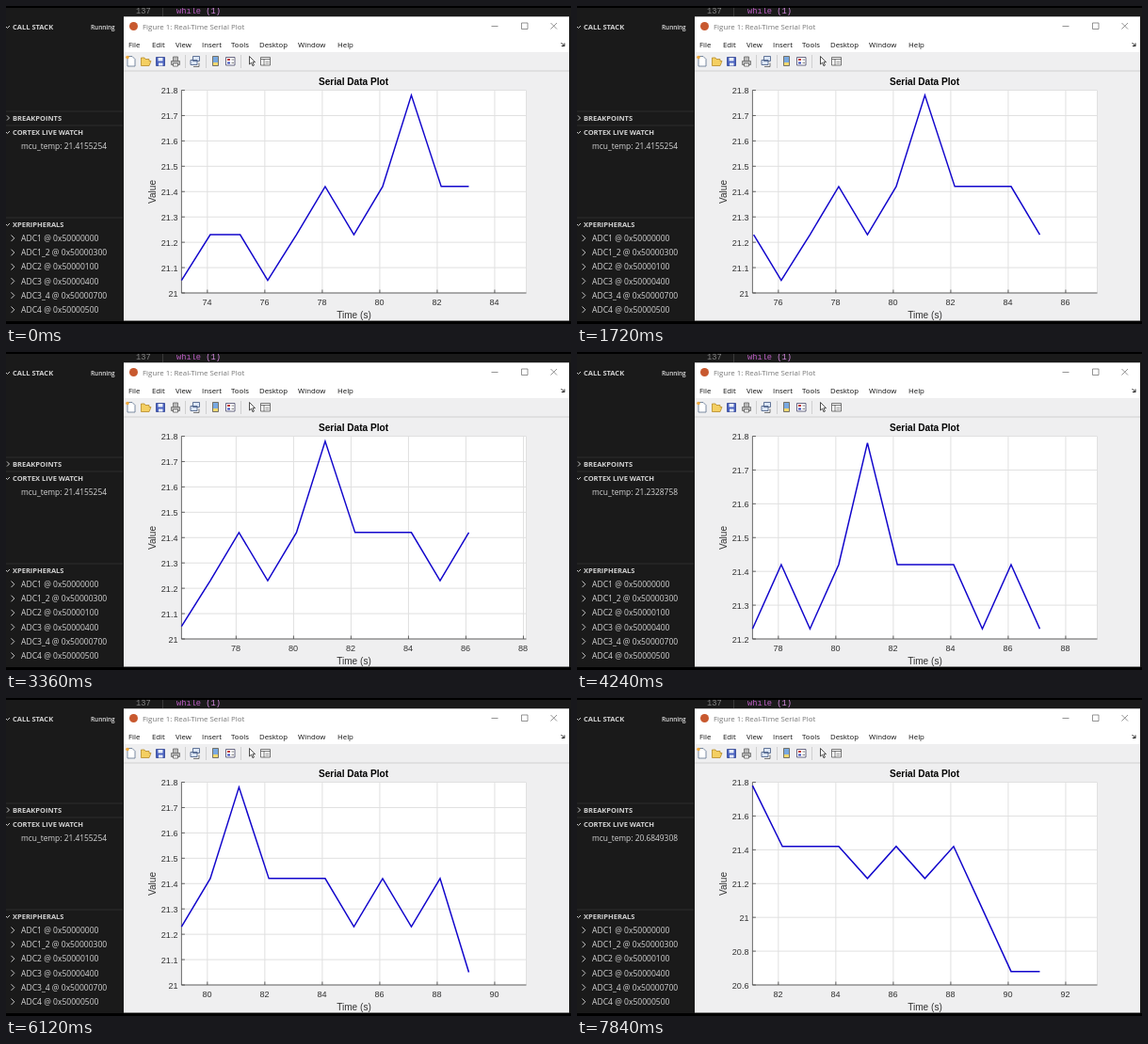
Recreate the animation shown at these times as an HTML page. Size 600x338 px, loop 8 s.

```html
<!DOCTYPE html>
<html lang="en">
<head>
<meta charset="utf-8">
<title>Real-Time Serial Plot</title>
<style>
  html, body { margin: 0; width: 100%; height: 100%; overflow: hidden; background: #000; }
  svg { display: block; width: 600px; height: 338px; }
  text { font-family: "Open Sans", sans-serif; white-space: pre; }
  .head { font-size: 7.5px; font-weight: 700; fill: #d2d2d2; }
  .item { font-size: 8.55px; fill: #d6d6d6; }
  .code { font: 8.7px "Liberation Mono", monospace; }
  .menu { font-size: 7.8px; fill: #111; }
  .line { fill: none; }
  #plot text, .label { font-family: "Liberation Sans", Arial, sans-serif; fill: #333; }
  #plot text { font-size: 9.1px; }
  .label { font-size: 10.1px; text-anchor: middle; }
</style>
</head>
<body>
<svg viewBox="0 0 600 338">
  <rect width="600" height="335" fill="#1a1a1a"/>

  <!-- editor strip -->
  <path class="line" stroke="#3a3a3a" d="M166.500 0v11"/>
  <text class="code" x="138" y="8" fill="#858585">137</text>
  <text class="code" x="181" y="8" fill="#c060c8">while <tspan fill="#d58be0">(1)</tspan></text>
  <rect width="600" height="2" fill="#000"/>

  <!-- sidebar -->
  <path class="line" stroke="#2c2c2c" d="M0 112H124M0 127H124M0 225H124"/>
  <text class="head" x="7" y="25">CALL STACK</text>
  <text x="90" y="24.500" font-size="6.4" font-weight="600" fill="#e0e0e0">Running</text>
  <text class="head" x="7" y="122">BREAKPOINTS</text>
  <text class="head" x="7" y="137">CORTEX LIVE WATCH</text>
  <text class="item" x="16" y="152" style="font-size:8.4px">mcu_temp: <tspan id="temp"></tspan></text>
  <text class="head" x="7" y="235">XPERIPHERALS</text>
  <path class="line" stroke="#c8c8c8" d="M-1 21l2.500 2.500 2.500-2.500M1 116.500l2.500 2.500-2.500 2.500M-1 133l2.500 2.500 2.500-2.500M-1 231l2.500 2.500 2.500-2.500"/>
  <g id="peripherals"></g>

  <!-- figure window -->
  <rect x="125" y="11.500" width="473" height="323" fill="#efeff0"/>
  <rect x="125" y="11.500" width="473" height="37.500" fill="#fff"/>
  <circle cx="135.500" cy="21.500" r="4.500" fill="#c8592f"/>
  <text x="145" y="24.500" font-size="7.9" fill="#777">Figure 1: Real-Time Serial Plot</text>
  <path class="line" stroke="#666" stroke-width=".7" d="M515.500 21.500h7M547.500 18h6.500v6.500h-6.500zM578.500 18l6.500 6.500m0-6.500l-6.500 6.500"/>
  <g id="menu"></g>
  <path class="line" stroke="#222" d="M589.500 39l3.500 3.500m0-3v3h-3"/>
  <path class="line" stroke="#d0d0d0" d="M125 69H598M190.500 52v14M212.500 52v14M249.500 52v14"/>

  <!-- toolbar -->
  <g class="line" stroke="#555" stroke-width=".8">
    <path fill="#fff" stroke="#5b6f8c" d="M129 53.500h5l3 3v7.500h-8z"/>
    <circle cx="129" cy="54.500" r="1.800" fill="#eda83c" stroke="none"/>
    <path fill="#f4cf62" stroke="#b68b28" d="M143.500 63.500v-8.500h3.500l1 1.500h4v2h2l-2 5z"/>
    <path fill="#4a62c0" stroke="#2d4090" d="M159.500 54.500h9v9h-9z"/>
    <path fill="#e8eef8" stroke="none" d="M161.500 55h5v3.500h-5zM162 60.500h4.500v3h-4.500z"/>
    <path fill="#bbb" stroke="#666" d="M175.500 58.500h9v4h-9zM177.500 58.500v-4.500h5v4.500"/>
    <path fill="#fff" d="M177.500 61h5v3h-5z"/>
    <path fill="#dce6f5" stroke="#3f5680" d="M198.500 53.500h7v5h-7zM196 57.500h7v5h-7z"/>
    <path d="M199 64.500h6v-4"/>
    <path fill="#f0d870" d="M219.500 53.500h6v10h-6z"/>
    <path fill="#78a8e0" stroke="none" d="M220 54h5v6h-5z"/>
    <path fill="#fff" stroke="#446" d="M233.500 54.500h9.500v8.500h-9.500z"/>
    <path stroke="#c03c3c" stroke-width="2" d="M235 57h3"/>
    <path stroke="#3c50c0" stroke-width="2" d="M235 60.500h3"/>
    <path stroke="#666" d="M239.500 57h2.500M239.500 60.500h2.500"/>
    <path fill="#fff" stroke="#222" d="M258.500 53.500v8.500l2-1.800 1.500 3.500 1.400-.7-1.500-3.300h2.600z"/>
    <path fill="#fff" d="M270.500 54.500h10v8.500h-10zM270.500 56.500h10M274 56.500v6.500"/>
    <path stroke="#777" d="M275.500 59h4M275.500 61h4"/>
  </g>

  <!-- axes -->
  <text class="label" x="369" y="84" font-weight="700" style="fill:#000">Serial Data Plot</text>
  <text class="label" x="369.500" y="331.500">Time (s)</text>
  <text class="label" transform="translate(159 197.500) rotate(-90)">Value</text>
  <rect x="186" y="89" width="366.500" height="216" fill="#fff"/>
  <g id="plot"></g>
</svg>
<script>
const LOOP = 8000, FIRST = 73, SPAN = 12;
const LEFT = 186.4, RIGHT = 552.5, TOP = 89.5, BOTTOM = 305;

// Sensor readings, one per second, as steps of the converter; the plot gets two decimals
const samples = [...'2332343464443434200'].map((level, i) => ({
  time: FIRST + i + (i === 9 || i === 2 ? 0.14 : 0.1),
  value: Math.round((20.6849308 + 0.1826486 * level) * 100) / 100
}));
const plotTimes = [0, 760, 1720, 2760, 3720, 4720, 5720, 6680, 7760];
const readings = [
  [0, '21.4155254'], [2040, '21.2328758'], [3280, '21.4155254'], [4120, '21.2328758'],
  [5160, '21.4155254'], [6160, '21.0502281'], [7320, '20.6849308']
];

const el = id => document.getElementById(id);

el('peripherals').innerHTML = ['1 @ 0x50000000', '1_2 @ 0x50000300', '2 @ 0x50000100',
  '3 @ 0x50000400', '3_4 @ 0x50000700', '4 @ 0x50000500'].map((name, i) => {
  const y = 250 + i * 15.2;
  return `<path class="line" stroke="#c8c8c8" d="M5.500 ${y - 6.5}l3.300 3.300-3.300 3.300"/>
    <text class="item" x="16" y="${y}">ADC${name}</text>`;
}).join('');

el('menu').innerHTML = Object.entries({
  File: 130, Edit: 155, View: 180, Insert: 208, Tools: 239, Desktop: 269, Window: 310, Help: 352
}).map(([name, x]) => `<text class="menu" x="${x}" y="44">${name}</text>`).join('');

function drawPlot(step) {
  const points = samples.slice(step, step + 11);
  const start = FIRST + step + 0.1;
  const low = Math.floor(Math.min(...points.map(p => p.value)) * 5) / 5, high = 21.8;
  const tick = high - low > 1 ? 0.2 : 0.1;
  const px = time => LEFT + Math.max(0, time - start) / SPAN * (RIGHT - LEFT);
  const py = value => BOTTOM - (value - low) / (high - low) * (BOTTOM - TOP);

  let grid = `M${RIGHT} ${TOP}V${BOTTOM}`, ticks = `M${LEFT} ${TOP}V${BOTTOM}H${RIGHT}`, labels = '';
  for (let t = Math.ceil(start / 2) * 2; t < start + SPAN; t += 2) {
    const x = px(t);
    grid += `M${x} ${TOP}V${BOTTOM}`;
    ticks += `M${x} ${BOTTOM}v-3.5`;
    labels += `<text x="${x - 0.4}" y="317.5" text-anchor="middle">${t}</text>`;
  }
  for (let v = low; v < high + 0.01; v += tick) {
    const y = py(v);
    grid += `M${LEFT} ${y}H${RIGHT}`;
    ticks += `M${LEFT} ${y}h3.5`;
    labels += `<text x="182.5" y="${y + 3.5}" text-anchor="end">${+v.toFixed(1)}</text>`;
  }
  const curve = points.map(p => `${px(p.time)},${py(p.value)}`).join(' ');
  el('plot').innerHTML = `<path class="line" stroke="#e0e0e0" d="${grid}"/>
    <path class="line" stroke="#444" stroke-width=".8" d="${ticks}"/>${labels}
    <polyline class="line" stroke="#1206cc" stroke-width="1.5" points="${curve}"/>`;
}

let shown = -1;
function render(now) {
  const t = now % LOOP;
  const step = plotTimes.findLastIndex(at => at <= t);
  if (step !== shown) drawPlot(shown = step);
  el('temp').textContent = readings.findLast(([at]) => at <= t)[1];
}

const origin = performance.now();
function frame() {
  render(performance.now() - origin);
  requestAnimationFrame(frame);
}
frame();
</script>
</body>
</html>
```
